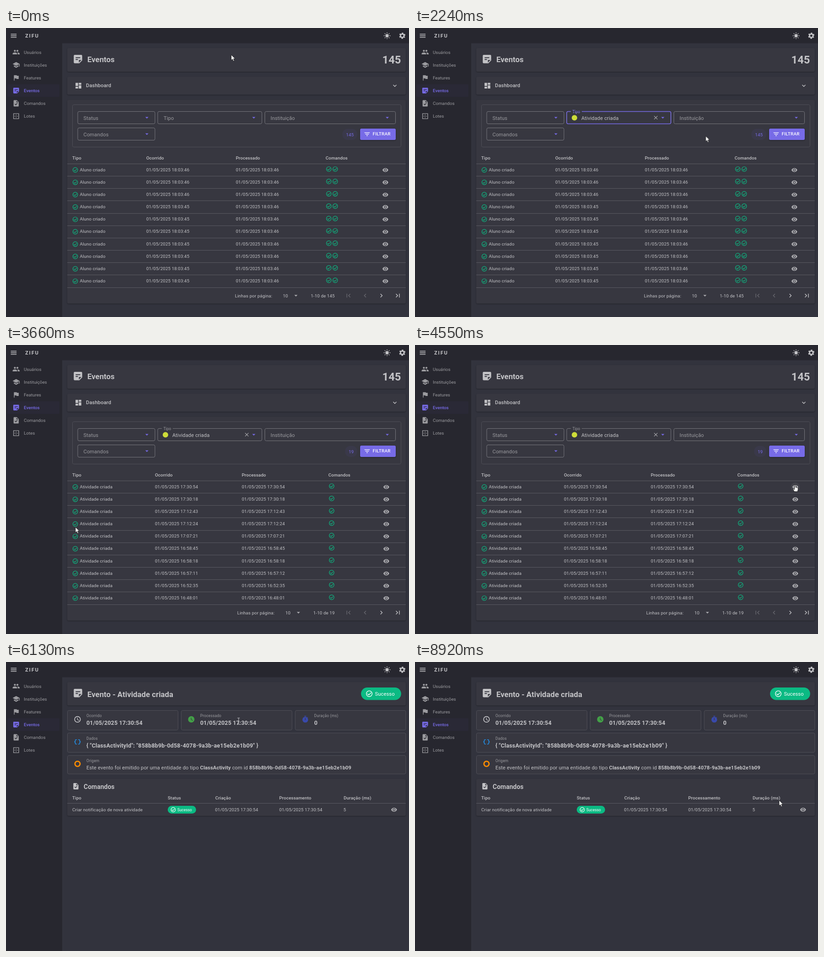
An HTML page for the animation above (9550 ms loop, 882 px wide and 635 px high).

```html
<!DOCTYPE html>
<html lang="pt-BR">
<head>
<meta charset="utf-8">
<title>Eventos</title>
<style>
  html, body { margin: 0; width: 100%; height: 100%; overflow: hidden; background: #32333d; }
  svg.stage { display: block; font-family: Roboto, Arial, sans-serif; }
  text { white-space: pre; }
  .card { fill: #373740; filter: drop-shadow(0 1px 1.2px rgba(0,0,0,.32)); }
  .menu { fill: #373740; filter: drop-shadow(0 3px 4px rgba(0,0,0,.4)); }
  .anim { opacity: 0; }
</style>
</head>
<body>
<svg class="stage" width="882" height="635" viewBox="0 0 882 635">
  <defs>
    <symbol id="menu" viewBox="0 0 24 24"><path d="M3 18h18v-2H3zM3 13h18v-2H3zM3 6v2h18V6z"/></symbol>
    <symbol id="sun" viewBox="0 0 24 24"><circle cx="12" cy="12" r="5.2"/><path d="M12 1.5v3M12 19.5v3M1.5 12h3M19.5 12h3M4.6 4.6l2 2M17.4 17.4l2 2M4.6 19.4l2-2M17.4 6.6l2-2" stroke="currentColor" stroke-width="2"/></symbol>
    <symbol id="gear" viewBox="0 0 24 24"><g fill="none" stroke="currentColor" transform="rotate(30 12 12)"><circle cx="12" cy="12" r="5.5" stroke-width="4"/><circle cx="12" cy="12" r="8.3" stroke-width="3" stroke-dasharray="4.7 3.992" stroke-dashoffset="2.35"/></g></symbol>
    <symbol id="people" viewBox="0 0 24 24"><circle cx="16" cy="8" r="3"/><circle cx="8" cy="8" r="3"/><path d="M8 13c-2.33 0-7 1.17-7 3.5V19h14v-2.5c0-2.33-4.67-3.5-7-3.5zM16 13l-1 .05c1.16.84 2 1.97 2 3.45V19h6v-2.5c0-2.33-4.67-3.5-7-3.5z"/></symbol>
    <symbol id="school" viewBox="0 0 24 24"><path d="M5 13.18v4L12 21l7-3.82v-4L12 17zM12 3L1 9l11 6 9-4.91V17h2V9z"/></symbol>
    <symbol id="flag" viewBox="0 0 24 24"><path d="M14.4 6L14 4H5v17h2v-7h5.6l.4 2h7V6z"/></symbol>
    <symbol id="note" viewBox="0 0 24 24"><path d="M19 3H5a2 2 0 0 0-2 2v14a2 2 0 0 0 2 2h10l6-6V5a2 2 0 0 0-2-2zM7 8h10v2H7zm5 6H7v-2h5zm2 5.5V14h5.5z"/></symbol>
    <symbol id="task" viewBox="0 0 24 24"><path d="M14 2H6a2 2 0 0 0-2 2v16a2 2 0 0 0 2 2h12a2 2 0 0 0 2-2V8zm-3.06 16L7.4 14.46l1.41-1.41 2.12 2.12 4.24-4.24 1.41 1.41zM13 9V3.5L18.5 9z"/></symbol>
    <symbol id="lots" viewBox="0 0 24 24"><path d="M4 4h16v16H4z" fill="none" stroke="currentColor" stroke-width="2"/><path d="M11 7h2v2h-2zM11 11h2v2h-2zM15 11h2v2h-2zM11 15h2v2h-2zM7 11h2v2H7z"/></symbol>
    <symbol id="dash" viewBox="0 0 24 24"><path d="M3 13h8V3H3zM3 21h8v-6H3zM13 21h8V11h-8zM13 3v6h8V3z"/></symbol>
    <symbol id="expand" viewBox="0 0 24 24"><path d="M7 9.3l5 5 5-5" fill="none" stroke="currentColor" stroke-width="2"/></symbol>
    <symbol id="drop" viewBox="0 0 24 24"><path d="M7 10l5 5 5-5z"/></symbol>
    <symbol id="filter" viewBox="0 0 24 24"><path d="M10 18h4v-2h-4zM3 6v2h18V6zM6 13h12v-2H6z"/></symbol>
    <symbol id="check" viewBox="0 0 24 24"><g fill="none" stroke="currentColor" stroke-width="2"><circle cx="12" cy="12" r="9"/><path d="M6.5 12l4 4 7-7"/></g></symbol>
    <symbol id="eye" viewBox="0 0 24 24"><path fill-rule="evenodd" d="M12 4.5C7 4.5 2.73 7.61 1 12c1.73 4.39 6 7.5 11 7.5s9.27-3.11 11-7.5c-1.73-4.39-6-7.5-11-7.5zM7 12a5 5 0 0 0 10 0 5 5 0 0 0-10 0z"/><circle cx="12" cy="12" r="3"/></symbol>
    <symbol id="first" viewBox="0 0 24 24"><path d="M17.7 6.7L12.4 12l5.3 5.3M7 6v12" fill="none" stroke="currentColor" stroke-width="2"/></symbol>
    <symbol id="prev" viewBox="0 0 24 24"><path d="M14.7 6.7L9.4 12l5.3 5.3" fill="none" stroke="currentColor" stroke-width="2"/></symbol>
    <symbol id="next" viewBox="0 0 24 24"><path d="M9.3 6.7l5.3 5.3-5.3 5.3" fill="none" stroke="currentColor" stroke-width="2"/></symbol>
    <symbol id="last" viewBox="0 0 24 24"><path d="M6.3 6.7l5.3 5.3-5.3 5.3M17 6v12" fill="none" stroke="currentColor" stroke-width="2"/></symbol>
    <symbol id="close" viewBox="0 0 24 24"><path d="M5.7 5.7l12.6 12.6M18.3 5.7L5.7 18.3" stroke="currentColor" stroke-width="2"/></symbol>
    <symbol id="clock" viewBox="0 0 24 24"><g fill="none" stroke="currentColor"><circle cx="12" cy="12" r="9" stroke-width="2"/><path d="M11.75 7v5.6l4.9 2.9" stroke-width="1.6"/></g></symbol>
    <symbol id="late" viewBox="0 0 24 24"><circle cx="12" cy="12" r="10"/><path d="M11.75 7v5.6l4.9 2.9" fill="none" stroke="#373740" stroke-width="1.6"/></symbol>
    <symbol id="timer" viewBox="0 0 24 24"><circle cx="12" cy="13" r="9"/><path d="M9 1h6v2H9zM18 6l1-1.4 1.4 1.4-1.4 1.4z"/><path d="M11 8h2v6h-2z" fill="#373740"/></symbol>
    <symbol id="braces" viewBox="0 0 24 24"><path d="M10 5H7a2 2 0 0 0-2 2v2a3 3 0 0 1-3 3 3 3 0 0 1 3 3v2a2 2 0 0 0 2 2h3M14 5h3a2 2 0 0 1 2 2v2a3 3 0 0 0 3 3 3 3 0 0 0-3 3v2a2 2 0 0 1-2 2h-3" fill="none" stroke="currentColor" stroke-width="2"/></symbol>
    <symbol id="ring" viewBox="0 0 24 24"><circle cx="12" cy="12" r="8" fill="none" stroke="currentColor" stroke-width="4"/></symbol>
    <clipPath id="btnClip"><rect x="775" y="221" width="78" height="25" rx="3"/></clipPath>
  </defs>
  <g id="frame"></g>
  <g id="list"></g>
  <g id="detail" class="anim"></g>
  <g id="cursor">
    <path id="arrow" d="M0 0v11.8l2.7-2.5 1.9 4.4 2-.9-1.9-4.2h3.7z" fill="#fff" stroke="#111" stroke-width=".7"/>
    <path id="hand" class="anim" d="M-1.2 1.2a1.2 1.2 0 0 1 2.4 0v4l4 .9q1.4.4 1.3 1.900l-.5 3.5-1 3H-1.4l-3-4.3q-.6-1.3.5-1.7l2.7 1.4z" fill="#fff" stroke="#111" stroke-width=".8"/>
    <path id="beam" class="anim" d="M-2.5-7h2q.5 0 .5.7q0-.7.5-.7h2M0-6.3v12.6M-2.5 7h2q.5 0 .5-.7q0 .7.5.7h2" fill="none" stroke="#c9c9cd" stroke-width="1"/>
  </g>
</svg>
<script>
const LOOP = 9550;
const INK = '#c3c3c6', DIM = '#9b9b9f', ICON = '#adadb1', OFF = '#68686f';
const PRIMARY = '#776be7', OK = '#0bba83', LINE = '#4f4f57', EDGE = '#77777d';
const $ = id => document.getElementById(id);

// Drawing helpers
const text = (x, y, s, { size = 9.8, fill = INK, weight = 400, gap = 0.1, anchor = 'start' } = {}) =>
  `<text x="${x}" y="${y}" font-size="${size}" fill="${fill}" font-weight="${weight}" letter-spacing="${gap}" text-anchor="${anchor}">${s}</text>`;
const icon = (id, cx, cy, size = 16.8, color = ICON) =>
  `<use href="#${id}" x="${cx - size / 2}" y="${cy - size / 2}" width="${size}" height="${size}" color="${color}" fill="${color}"/>`;
const rect = (x, y, x2, y2, attrs = '') =>
  `<rect x="${x}" y="${y}" width="${x2 - x}" height="${y2 - y}" ${attrs}/>`;
const card = (y, y2) => rect(134, y, 875, y2, 'rx="3" class="card"');
const outline = (x, y, x2, y2, color = LINE) =>
  rect(x + .5, y + .5, x2 - .5, y2 - .5, `rx="3" fill="#373740" stroke="${color}"`);
const rule = y => `<path d="M134 ${y}H875" stroke="#5a5a62"/>`;
const dot = (x, y, color) => `<circle cx="${x}" cy="${y}" r="6" fill="${color}"/>`;
const group = (id, body) => `<g id="${id}" class="anim">${body}</g>`;
const heads = (y, cols) => cols.map(([x, s]) => text(x, y, s, { weight: 500 })).join('');

function drawFrame() {
  const links = [['people', 'Usuários'], ['school', 'Instituições'], ['flag', 'Features'],
    ['note', 'Eventos'], ['task', 'Comandos'], ['lots', 'Lotes']];
  return rect(0, 0, 882, 635, 'fill="#32333d"') + rect(0, 33, 123, 635, 'fill="#27272f"') +
    rect(0, 0, 882, 33.5, 'fill="#27272f"') +
    icon('menu', 16.8, 17, 16.8, INK) + text(42, 21, 'ZIFU', { size: 11.2, weight: 700, gap: 1.8 }) +
    icon('sun', 834, 17, 16.8, INK) + icon('gear', 867.3, 17, 16.8, INK) +
    rect(3, 123.5, 117, 151.5, `rx="3" fill="${PRIMARY}" opacity=".03"`) +
    links.map(([id, label], i) => {
      const y = 53 + i * 28.15, on = i === 3;
      return icon(id, 22.2, y, 16.8, on ? PRIMARY : DIM) +
        text(39, y + 3.5, label, { fill: on ? PRIMARY : DIM, weight: on ? 500 : 400, gap: 0 });
    }).join('');
}

const select = (x, y, x2, label, arrowX) => outline(x, y, x2, y + 28, EDGE) +
  (label ? text(x + 13, y + 19, label, { size: 11.2, fill: DIM }) : '') +
  icon('drop', arrowX, y + 14, 16.8, PRIMARY);

const floatLabel = color => rect(341, 182, 365, 185, 'fill="#373740"') +
  text(344.5, 187, 'Tipo', { size: 8.4, fill: color });

function drawTable(rows, { kind, cols, eye, checks, pager, total }) {
  const [, made, done] = cols;
  const body = rows.map(([a, b], i) => {
    const y = 311 + i * 27.15;
    return icon('check', 151.6, y + .9, 14, OK) + text(161.5, y + 3.7, kind) +
      text(made, y + 3.7, '01/05/2025 ' + a) + text(done, y + 3.7, '01/05/2025 ' + b) +
      checks.map(x => icon('check', x, y - 1, 14, OK)).join('') +
      icon('eye', eye, y + 1, 14) + rule(Math.round(298 + (i + 1) * 27.15) + .5);
  }).join('');
  const [label, size, arrow, range] = pager;
  return heads(288.5, ['Tipo', 'Ocorrido', 'Processado', 'Comandos'].map((s, i) => [cols[i], s])) + body +
    rect(total > 99 ? 736 : 742, 221.5, 769, 246, `rx="12" fill="${PRIMARY}" opacity=".06"`) +
    text(761.2, 237.5, total, { fill: PRIMARY, anchor: 'end' }) +
    text(label, 591.5, 'Linhas por página:') + text(size, 591.5, '10') + icon('drop', arrow, 588) +
    text(range, 591.5, '1-10 de ' + total);
}

function drawMenu() {
  const items = [['Nota adicionada', '#673ab7'], ['Aluno criado', '#2196f3'], ['Atividade criada', '#cddc39'],
    ['Professor criado', '#f44336'], ['Registro de usuário criado', '#ffc107'], ['Instituição criada', '#009688']];
  const t = (y, s) => text(365.3, y, s, { size: 11.2 });
  return rect(331.5, 183, 560.5, 391, 'rx="3" class="menu"') +
    `<g id="hover">${rect(332, 183, 557.5, 210.8, 'fill="#404049"')}</g>` +
    items.map(([s, c], i) => dot(350, 196 + i * 27.8, c) + t(200.6 + i * 27.8, s)).join('') +
    dot(350, 371, '#4caf50') + t(367.8, 'Token de redefinição de senha') + t(384.5, 'gerado') +
    rect(557.5, 183, 559, 388.5, 'fill="#c9c9cc"');
}

function drawList() {
  const before = Array.from({ length: 10 }, (_, i) => [i < 3 ? '18:03:46' : '18:03:45', '18:03:46']);
  const after = ['17:30:54', '17:30:18', '17:12:43', '17:12:24', '17:07:21', '16:58:45', '16:58:18',
    '16:57:11', '16:52:35', '16:48:01'].map(s => [s, s.replace('57:11', '57:12')]);
  const filled = floatLabel(DIM) + dot(349, 197.3, '#cddc39') +
    text(364, 202.3, 'Atividade criada', { size: 11.2 }) + icon('close', 527, 197, 14);
  return card(44, 96) + icon('note', 157.5, 68.3, 24.5, INK) +
    text(178, 75.3, 'Eventos', { size: 16.8, weight: 700, gap: 0 }) +
    text(864.5, 78, '145', { size: 23.8, weight: 700, gap: 0, anchor: 'end' }) +
    card(107, 146.5) + icon('dash', 158.5, 126.8, 16.8, INK) +
    text(175, 130.3, 'Dashboard', { size: 11.2, weight: 500 }) + icon('expand', 851, 127, 16.8, INK) +
    card(158, 605.5) + outline(145, 168, 865, 262) +
    select(156.5, 183, 326.5, 'Status', 308.3) + select(331.5, 183, 560.5, '', 542.3) +
    select(566, 183, 853, 'Instituição', 834.5) + select(156.5, 219, 326.5, 'Comandos', 308.3) +
    group('idle', text(345, 202, 'Tipo', { size: 11.2, fill: DIM })) +
    group('focus', rect(332, 183.5, 560, 210.5, `rx="3" fill="none" stroke="${PRIMARY}" stroke-width="1.4"`)) +
    group('filled', filled) +
    group('focusLabel', floatLabel(PRIMARY)) +
    rect(775, 221, 853, 246, `rx="3" fill="${PRIMARY}" style="filter:drop-shadow(0 1px 1.5px rgba(0,0,0,.4))"`) +
    group('press', rect(775, 221, 853, 246, 'rx="3" fill="#5a4be2"')) +
    `<g clip-path="url(#btnClip)"><circle id="ripple" class="anim" cx="784" cy="229" r="9" fill="#fff"/></g>` +
    icon('filter', 790.3, 233.3, 15.4, '#fff') +
    text(802.5, 236.4, 'FILTRAR', { fill: '#fff', weight: 500, gap: .28 }) +
    rule(298.5) +
    group('before', drawTable(before, { kind: 'Aluno criado', cols: [145, 307, 503, 699.5], eye: 830.3,
      checks: [706.5, 720.5], pager: [501, 606, 634.5, 667], total: 145 })) +
    group('after', drawTable(after, { kind: 'Atividade criada', cols: [145, 326, 516, 705.5], eye: 832.3,
      checks: [712.7], pager: [506, 611.5, 640, 672.5], total: 19 })) +
    icon('first', 749.5, 588, 16.8, OFF) + icon('prev', 786, 588, 16.8, OFF) +
    icon('next', 821.5, 588, 16.8, INK) + icon('last', 857.5, 588, 16.8, INK) +
    group('eyeHover', '<circle cx="832.3" cy="312" r="10" fill="#fff" opacity=".05"/>') +
    group('menuBox', drawMenu());
}

const info = (x, y, x2, y2, id, color, label, value) =>
  outline(x, y, x2, y2) + icon(id, x + 22.5, y + 20, 16.8, color) +
  text(x + 42, y + 15.2, label, { size: 8.4, fill: DIM, gap: .2 }) +
  text(x + 42, y + 32.4, value, { size: 12.6, weight: 700 });

function drawDetail() {
  const id = '858b8b9b-0d58-4078-9a3b-ae15eb2e1b09', when = '01/05/2025 17:30:54';
  const bold = s => `<tspan font-weight="700">${s}</tspan>`;
  return card(44, 95.5) + icon('note', 157.5, 68.3, 24.5, INK) +
    text(178, 76.8, 'Evento - Atividade criada', { size: 16.8, weight: 700, gap: 0 }) +
    rect(777, 56, 864.8, 83.5, `rx="13.8" fill="${OK}"`) + icon('check', 795, 69.7, 16.8, '#fff') +
    text(807.5, 73.8, 'Sucesso', { size: 11.2, fill: '#fff' }) +
    info(134, 106, 377, 150, 'clock', '#d5d5d8', 'Ocorrido', when) +
    info(383, 106, 626.5, 150, 'late', '#43a047', 'Processado', when) +
    info(632.5, 106, 875.5, 150, 'timer', '#3949ab', 'Duração (ms)', '0') +
    info(134, 155.5, 875.5, 199, 'braces', '#2196f3', 'Dados', `{ "ClassActivityId": "${id}" }`) +
    outline(134, 205, 875.5, 246.5) + icon('ring', 156.5, 223.7, 16.8, '#fb8c00') +
    text(176, 220, 'Origem', { size: 8.4, fill: DIM, gap: .2 }) +
    text(176, 236, `Este evento foi emitido por uma entidade do tipo ${bold('ClassActivity')} com id ${bold(id)}`, { size: 11.2 }) +
    card(257, 338) + icon('task', 153, 273, 16.8, INK) +
    text(170, 279.3, 'Comandos', { size: 14, weight: 700, gap: 0 }) +
    heads(301.8, [[145, 'Tipo'], [354, 'Status'], [458, 'Criação'], [598, 'Processamento'], [739, 'Duração (ms)']]) +
    rule(310.5) + text(145, 327.6, 'Criar notificação de nova atividade') +
    rect(354, 316, 416, 333, `rx="8.5" fill="${OK}"`) + icon('check', 366, 324.5, 13, '#fff') +
    text(375, 327.6, 'Sucesso', { size: 8.4, fill: '#fff', gap: 0 }) +
    text(457.5, 327.6, when) + text(598, 327.6, when) + text(738.5, 327.6, '5') + icon('eye', 849.3, 324.5, 14);
}

$('frame').innerHTML = drawFrame();
$('list').innerHTML = drawList();
$('detail').innerHTML = drawDetail();

// Timeline helpers: rows are [ms, value], the first at 0
const begin = document.timeline.currentTime || 0;
function play(id, prop, rows, easing) {
  const all = [...rows, [LOOP, rows[rows.length - 1][1]]];
  const keys = all.map(([t, v]) => ({ offset: t / LOOP, [prop]: v, easing }));
  $(id).animate(keys, { duration: LOOP, iterations: Infinity }).startTime = begin;
}
// Visible only during the given spans; no two rows share a time
function show(id, ...spans) {
  const rows = spans.flatMap(([a, b]) => [[a, 1], [b, 0]]).filter(([t]) => t < LOOP);
  if (rows[0][0] > 0) rows.unshift([0, 0]);
  play(id, 'opacity', rows, 'step-end');
}
const fade = (id, rows) => play(id, 'opacity', rows, 'ease-out');

show('list', [0, 4680]);
show('detail', [4680, LOOP]);
show('idle', [0, 1060]);
show('focus', [1060, 2620]);
show('focusLabel', [1060, 2620]);
show('filled', [1900, LOOP]);
show('before', [0, 2720]);
show('after', [2720, LOOP]);
show('press', [2540, 2880]);
show('eyeHover', [4430, 4680]);
fade('menuBox', [[0, 0], [1060, 0], [1230, 1], [1890, 1], [2050, 0]]);
play('hover', 'transform', [[0, 0], [1380, 1], [1500, 2]].map(([t, n]) => [t, `translateY(${n * 27.8}px)`]), 'step-end');
fade('ripple', [[0, 0], [2700, 0], [2730, .16], [2800, .16], [2960, 0]]);

const path = [
  [0, 493, 59], [39, 493, 59], [40, 490.5, 58], [320, 490.5, 58], [960, 489, 192], [1260, 489, 197],
  [1630, 489, 246], [1920, 489, 246], [2560, 782, 229], [2840, 782, 229], [3360, 152, 330],
  [3740, 152, 407], [3800, 158, 404], [4450, 832, 308], [4760, 832, 306], [5200, 800, 75],
  [5720, 301, 128], [5770, 303, 129], [6130, 509, 130], [6400, 698, 130], [6710, 613, 173],
  [7120, 337, 180], [7250, 339, 229], [7670, 608, 231], [7800, 572, 245], [8130, 308, 309],
  [8640, 661, 314], [8920, 797, 304]
];
play('cursor', 'transform', path.map(([t, x, y]) => [t, `translate(${x}px,${y}px)`]), 'ease-in-out');

const hands = [[880, 2120], [2540, 2890], [4430, 4760]];
const beams = [[5960, 6210], [6870, 7720], [8340, 8430], [8550, 8700]];
show('hand', ...hands);
show('beam', ...beams);
play('arrow', 'opacity', [[0, 1], ...[...hands, ...beams].flatMap(([a, b]) => [[a, 0], [b, 1]])], 'step-end');
</script>
</body>
</html>
```
